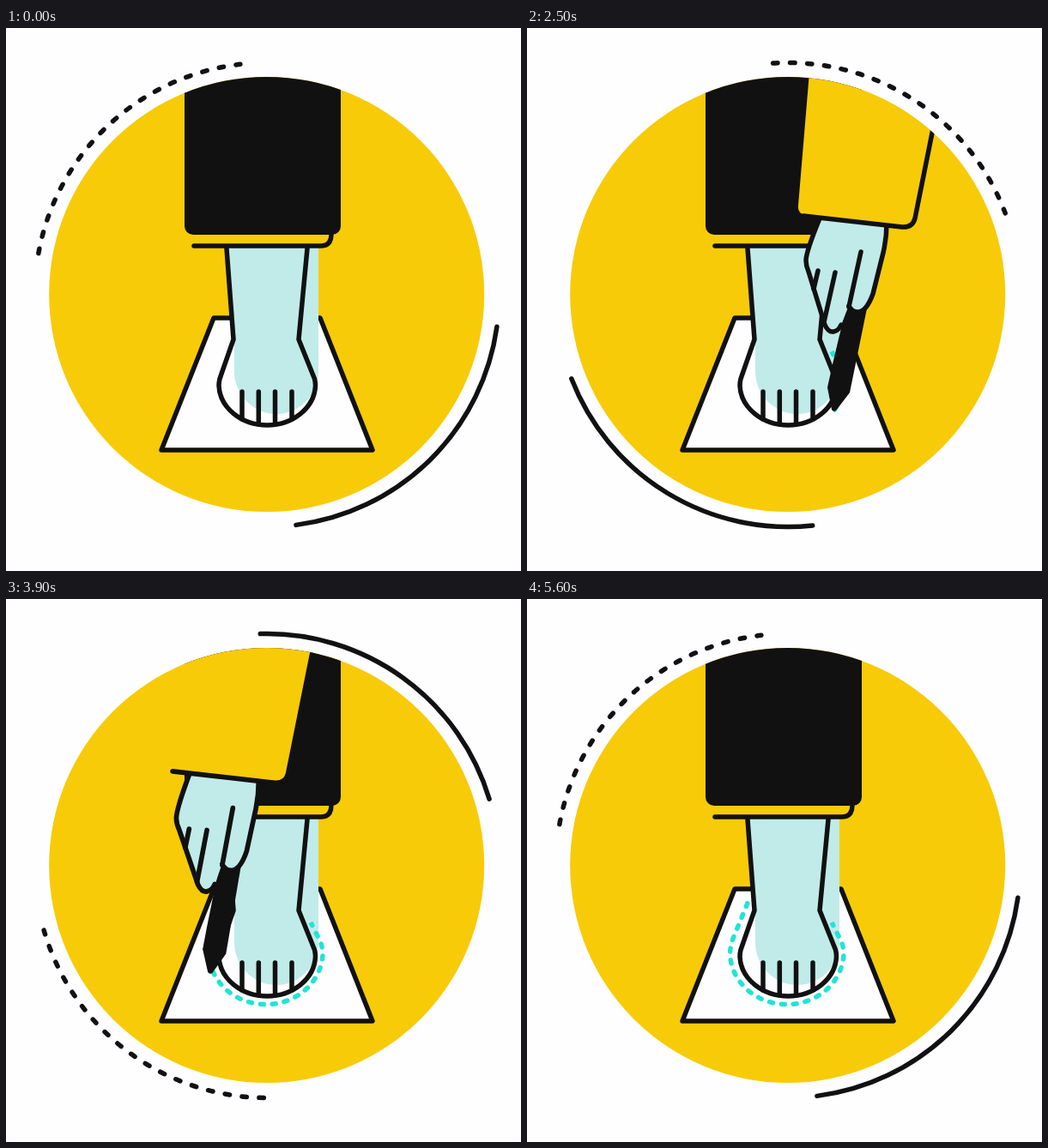
Write an HTML page that moves like this. It is 600 by 633 pixels and loops after 5.7 s.

```html
<!DOCTYPE html>
<html lang="en">
<head>
<meta charset="utf-8">
<title>Foot tracing</title>
<style>
  html, body { margin: 0; width: 100%; height: 100%; overflow: hidden; background: #fefdff; }
  svg { display: block; width: 600px; height: 633px; }
  .line { fill: none; stroke: #111; stroke-width: 5.5; stroke-linecap: round; stroke-linejoin: round; }
  .ink { fill: #111; }
  .sun { fill: #f7cb08; }
  .skin { fill: #c0ebe9; }
</style>
</head>
<body>
<svg viewBox="0 0 600 633">
  <defs>
    <clipPath id="disc"><circle cx="303.7" cy="310.5" r="253.5"/></clipPath>
    <clipPath id="offFoot">
      <path clip-rule="evenodd" d="M0 0H600V633H0Z M257 257L265 363L249 409Q248 413 248 417A56.3 48 0 0 0 360.5 417Q360.500 413 359.500 409L341 363L351 257Z"/>
    </clipPath>
    <mask id="traced" maskUnits="userSpaceOnUse" x="0" y="0" width="600" height="633">
      <path id="reveal" fill="none" stroke="#fff" stroke-width="14" pathLength="1"/>
    </mask>
  </defs>

  <g id="ring">
    <path id="dashes" class="line" stroke-dasharray="5.5 14.5"/>
    <path id="arc" class="line"/>
  </g>

  <g clip-path="url(#disc)">
    <rect class="sun" width="600" height="633"/>

    <path class="line" style="fill:#fefdff" d="M242 338H366L427 492H181Z"/>
    <path class="skin" d="M257 256H364V400A49 50 0 0 1 266 400V363Z"/>
    <path class="line" d="M257 257L265 363L249 409Q248 413 248 417A56.300 48 0 0 0 360.500 417Q360.500 413 359.500 409L341 363L351 257"/>
    <path class="line" d="M275 424V456M294.300 424V462M313.500 424V462M333 424V456"/>

    <path class="sun" d="M219 238H378V246Q378 254 368 254H219Z"/>
    <path class="line" d="M219 254H367Q379 254 379 240"/>
    <rect class="ink" x="208" y="20" width="182" height="221" rx="10"/>

    <g mask="url(#traced)">
      <path id="trace" fill="none" stroke="#1fe5d5" stroke-width="5.5" stroke-linecap="round" stroke-dasharray="4 10"/>
    </g>

    <g id="penLayer">
      <path id="pen" class="ink" d="M374 316L397 322L376 425L360 446Q357 448 355 445L350 419L356 392Z"/>
    </g>

    <g id="hand">
      <path class="skin" d="M341 222C332 244 325 262 325 271Q325 277 328 284L347 346Q351 355 357 354Q364 353 367 344L375 323Q379 332 387 331Q396 329 403 310L415 262Q419 245 419 228Z"/>
      <path class="line" d="M341 222C332 244 325 262 325 271Q325 277 328 284L347 346Q351 355 357 354Q363 353 366 346M375 324Q379 332 387 331Q396 329 403 310L415 262Q419 245 419 228"/>
      <path class="line" d="M389 261L375 325M359 285L346 343M339 283L334 304"/>
    </g>

    <g id="sleeve">
      <path class="sun" d="M341 -92L316 207Q315 216 324 218L438 230Q449 231 451 222L514 -92Z"/>
      <path class="line" d="M322 219L437 232Q449 233 452 222L515 -92"/>
    </g>
  </g>
</svg>

<script>
  const LOOP = 5700, STEP = 100;
  const CENTER = [304, 311], RADIUS = 270.5;
  const WRIST = [369, 232];
  const PEN_ON_TOP = 2000;

  // time, angle
  const ringKeys = [
    [1200, 0], [1300, -0.4], [1500, -2.5], [1800, 1.3], [2100, 25.8], [2500, 76],
    [3400, 192.4], [4500, 334.2], [4800, 358.7], [5100, 362], [5300, 360.4], [5400, 360]
  ];
  // time, wrist x, wrist y, hand angle, scale
  const armKeys = [
    [600, 395, -160, -24, 1], [1300, 395, 162, -24, 1], [1800, 397, 192, 19.5, 1],
    [2150, 399, 198, 6, 1], [2500, 369, 232, 0, 1], [2950, 338, 247, -1, 1.04],
    [3400, 287, 245, -2, 1.08], [3950, 242, 210, -1.8, 1.03], [4500, 269, 137, -1.5, 0.985],
    [5300, 285, -190, -1.5, 0.985]
  ];
  // time, drawn share
  const traceKeys = [[2000, 0], [2500, 0.25], [3400, 0.54], [3950, 0.78], [4400, 1]];

  const $ = id => document.getElementById(id);

  // Smooth value of one column, never overshooting its keys.
  function sample(keys, t, col = 1) {
    const last = keys.length - 1;
    if (t <= keys[0][0]) return keys[0][col];
    if (t >= keys[last][0]) return keys[last][col];
    const i = keys.findIndex(k => k[0] > t) - 1;
    const slope = j => (keys[j + 1][col] - keys[j][col]) / (keys[j + 1][0] - keys[j][0]);
    const tangent = j => {
      if (j === 0 || j === last) return 0;
      const a = slope(j - 1), b = slope(j);
      return a * b <= 0 ? 0 : 2 * a * b / (a + b);
    };
    const span = keys[i + 1][0] - keys[i][0];
    const u = (t - keys[i][0]) / span, v = 1 - u;
    return keys[i][col] * v * v * (1 + 2 * u) + keys[i + 1][col] * u * u * (1 + 2 * v)
      + span * u * v * (tangent(i) * v - tangent(i + 1) * u);
  }

  function arcPath(from, to) {
    const point = deg => {
      const a = deg * Math.PI / 180;
      return `${CENTER[0] + RADIUS * Math.cos(a)} ${CENTER[1] + RADIUS * Math.sin(a)}`;
    };
    return `M${point(from)}A${RADIUS} ${RADIUS} 0 0 1 ${point(to)}`;
  }

  const place = (x, y, angle, scale) =>
    `translate(${x} ${y}) scale(${scale}) rotate(${angle}) translate(${-WRIST[0]} ${-WRIST[1]})`;

  $('dashes').setAttribute('d', arcPath(190.3, 263.4));
  $('arc').setAttribute('d', arcPath(7.9, 82.8));
  const outline = 'M355 377L366 399Q369 406 369 414A66.3 61 0 0 1 236.500 414Q236.500 406 240 396L258 352';
  $('trace').setAttribute('d', outline);
  $('reveal').setAttribute('d', outline);

  function draw(t) {
    $('ring').setAttribute('transform', `rotate(${sample(ringKeys, t)} ${CENTER})`);

    const [x, y, angle, scale] = [1, 2, 3, 4].map(col => sample(armKeys, t, col));
    const held = place(x, y, angle, scale);
    $('pen').setAttribute('transform', held);
    $('hand').setAttribute('transform', held);
    $('sleeve').setAttribute('transform', place(x, y, 0, scale));
    $('penLayer').setAttribute('clip-path', t < PEN_ON_TOP ? 'url(#offFoot)' : 'none');

    const share = sample(traceKeys, t);
    $('trace').style.display = share > 0 ? '' : 'none';
    $('reveal').setAttribute('stroke-dasharray', share >= 1 ? 'none' : `${share} 2`);
  }

  const start = performance.now();
  function tick() {
    const t = (performance.now() - start) % LOOP;
    draw(Math.floor(t / STEP) * STEP);
    requestAnimationFrame(tick);
  }
  tick();
</script>
</body>
</html>
```
